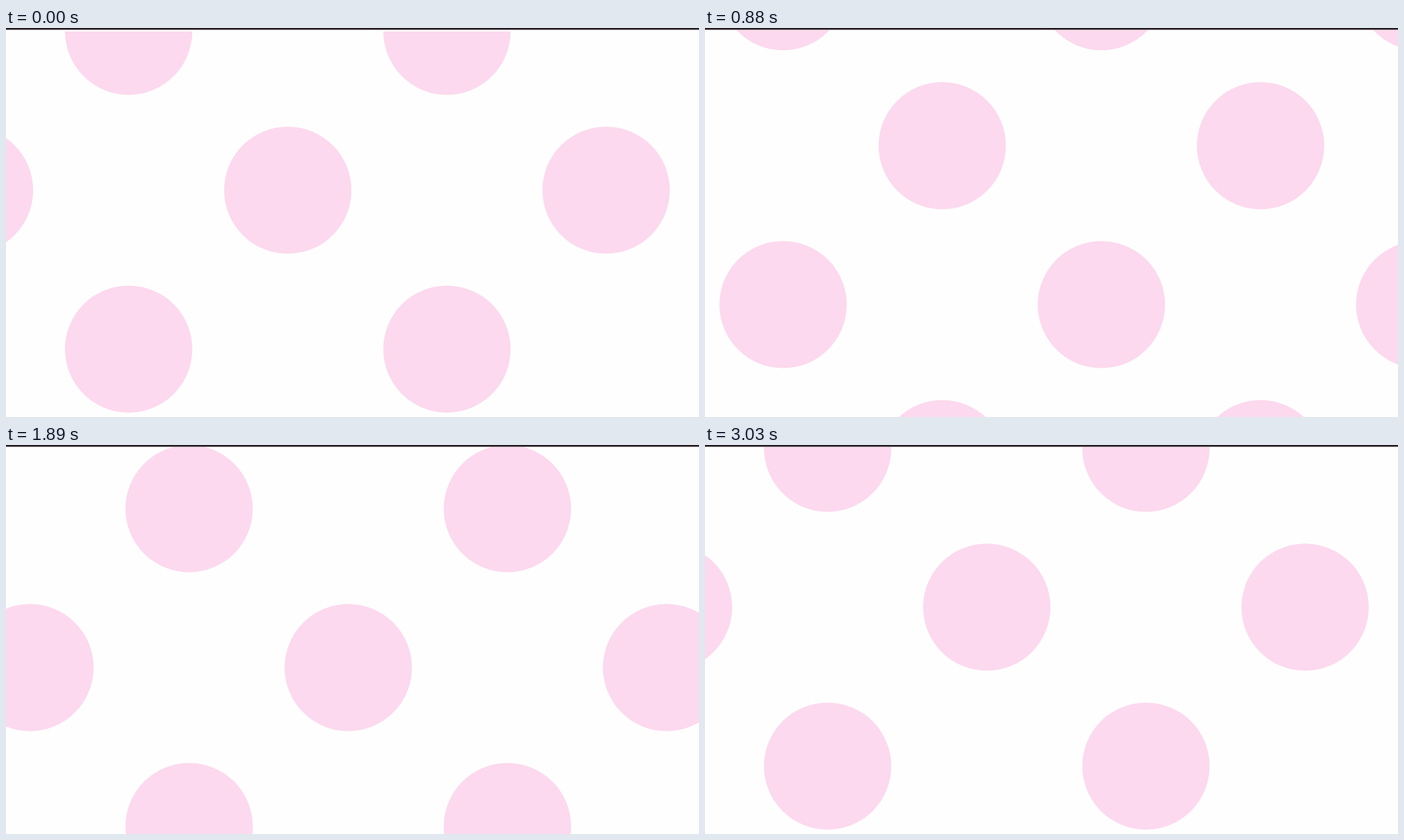
Recreate the animation shown at these times as an HTML page. Size 998 px wide and 561 px high, loop 3.11 s.

```html
<!DOCTYPE html>
<html lang="en">
<head>
<meta charset="utf-8">
<title>Drifting dots</title>
<style>
  html, body { margin: 0; width: 100%; height: 100%; overflow: hidden; background: #fefefe; }
  svg { display: block; width: 998px; height: 561px; }
</style>
</head>
<body>
<svg viewBox="0 0 998 561">
  <rect width="998" height="561" fill="#fefefe"/>
  <g id="dots" fill="#fcd9ee"></g>
  <rect id="gap" y="3" width="998" height="2" fill="#fefefe"/>
  <rect width="998" height="2" fill="#231b1f"/>
  <rect y="2" width="998" height="1" fill="#8f888c"/>
</svg>
<script>
const LOOP = 3110;
const STEPS = 100;
const SPACING = 229.2;
const RADIUS = 91.7;
const ORIGIN = { x: 176.6, y: 4.7 };

const dots = document.getElementById('dots');
const gap = document.getElementById('gap');

// Staggered lattice, large enough to cover the stage during the whole drift.
for (let row = 0; row <= 4; row++) {
  for (let col = -2; col <= 6; col++) {
    if ((row + col) % 2) continue;
    const dot = document.createElementNS('http://www.w3.org/2000/svg', 'circle');
    dot.setAttribute('cx', ORIGIN.x + col * SPACING);
    dot.setAttribute('cy', ORIGIN.y + row * SPACING);
    dot.setAttribute('r', RADIUS);
    dots.append(dot);
  }
}

// Steps last 30, 40, 30 ms in turn; two in every eighteen are skipped.
const isSkipped = n => n > 0 && (n % 18 === 0 || n % 18 === 15);
const duration = n => isSkipped(n) ? 0 : n % 3 === 1 ? 40 : 30;

function stepAt(time) {
  let n = 0;
  let end = duration(0);
  while (n < STEPS && time >= end) end += duration(++n);
  return n;
}

function draw(time) {
  const step = stepAt(time);
  const shift = -SPACING * step / STEPS;
  dots.setAttribute('transform', `translate(${shift} ${shift})`);
  gap.setAttribute('visibility', step === 0 ? 'visible' : 'hidden');
}

const start = performance.now();
function tick() {
  draw((performance.now() - start) % LOOP);
  requestAnimationFrame(tick);
}
tick();
</script>
</body>
</html>
```
